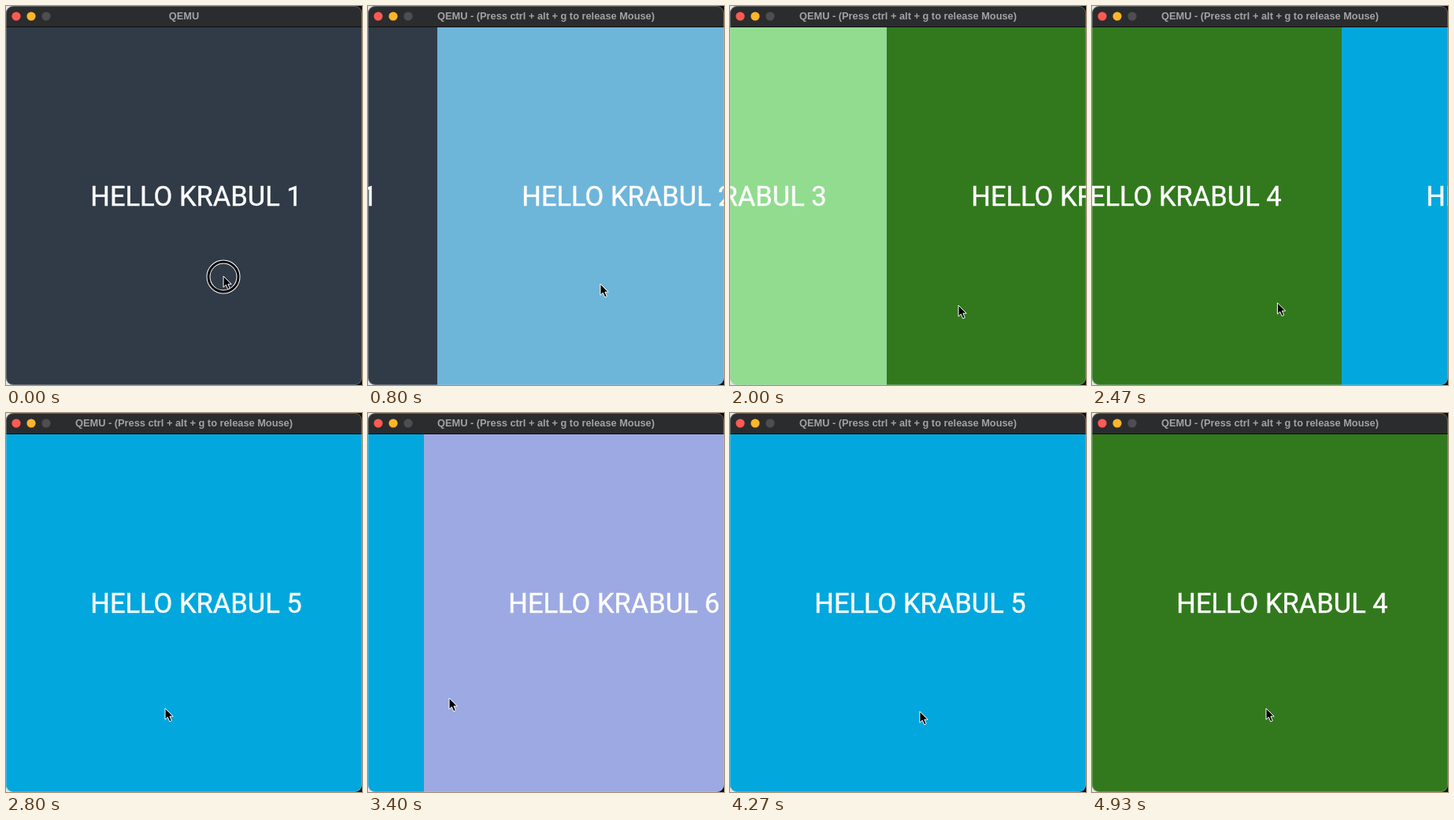
Recreate the animation shown at these times as an HTML page. Size 452 by 480 pixels, loop 4990 ms.

```html
<!DOCTYPE html>
<html lang="en">
<head>
<meta charset="utf-8">
<title>Swiper demo</title>
<style>
  html, body { margin: 0; width: 100%; height: 100%; overflow: hidden; }
  body { background: linear-gradient(to right, #e6e6e6, #0c0d0f); }
  svg { display: block; width: 100vw; height: 100vh; }
  .label { font: 34.5px Roboto, sans-serif; fill: #fff; stroke: #fff; stroke-width: .45px; }
  .title { font: bold 12.8px "Liberation Sans", Arial, sans-serif; fill: #a3a3a5; text-anchor: middle; }
</style>
</head>
<body>
<svg viewBox="0 0 452 480">
  <defs>
    <clipPath id="window"><rect width="452" height="480" rx="9"/></clipPath>
  </defs>
  <g clip-path="url(#window)">
    <g id="pages"></g>
    <rect width="452" height="27" fill="#2b2c2e"/>
    <rect y="26" width="452" height="1" fill="#0d0e10"/>
    <g id="buttons"></g>
    <text id="title" class="title" x="226" y="17.4"></text>
  </g>
  <rect x=".5" y=".5" width="451" height="479" rx="8.5" fill="none" stroke="#c8ccd0" stroke-opacity=".32"/>
  <g id="ring" fill="none">
    <circle cx="276" cy="343" r="19" stroke="#fff" stroke-width="5"/>
    <circle cx="276" cy="343" r="19" stroke="#000" stroke-width="3"/>
  </g>
  <path id="cursor" d="M0 0V14.2L3.3 11.2L5.7 16.8L8.3 15.7L5.9 10.2H10.2Z"
        fill="#000" stroke="#fff" stroke-linejoin="round"/>
</svg>
<script>
const LOOP = 4990, STEPS = 75, PAGE_WIDTH = 452;
const SWIPE_TIME = 520, GRAB_TIME = 190, LAST_PAGE = 5;
const pageColors = ["#313b47", "#6eb5da", "#92dc90", "#32791d", "#01a7dd", "#9da9e2"];
const buttonColors = ["#ff5a52", "#fdb52a", "#4e4e50"];
const swipeStarts = [430, 1080, 1716, 2270, 3008, 3690, 4350];

// key points of the pointer tip
const pointerKeys = [
  { t: 0, x: 276, y: 342 }, { t: 800, x: 295, y: 352 }, { t: 2000, x: 290, y: 379 },
  { t: 2800, x: 202, y: 374 }, { t: 3400, x: 103, y: 361 }, { t: 4270, x: 241, y: 378 },
  { t: 4930, x: 221, y: 374 }
];

const $ = id => document.getElementById(id);
const clamp = v => Math.max(0, Math.min(1, v));
const ease = p => (1 - Math.cos(Math.PI * clamp(p))) / 2;

$("pages").innerHTML = pageColors.map((color, i) => `
  <g transform="translate(${i * PAGE_WIDTH} 0)">
    <rect y="27" width="${PAGE_WIDTH + 1}" height="453" fill="${color}"/>
    <text class="label" x="107.3" y="252.8">HELLO KRABUL ${i + 1}</text>
  </g>`).join("");

$("buttons").innerHTML = buttonColors.map((color, i) =>
  `<circle cx="${13 + 19 * i}" cy="13" r="5.6" fill="${color}"/>`).join("");

// swipes run forward to the last page, then back
function pageAt(t) {
  const swiped = swipeStarts.reduce((sum, start) => sum + ease((t - start) / SWIPE_TIME), 0);
  return LAST_PAGE - Math.abs(LAST_PAGE - swiped);
}

function pointerAt(t) {
  let { x, y } = pointerKeys[0];
  pointerKeys.slice(1).forEach((key, i) => {
    const from = pointerKeys[i], p = ease((t - from.t) / (key.t - from.t));
    x += (key.x - from.x) * p;
    y += (key.y - from.y) * p;
  });
  return [x, y];
}

function draw(t) {
  const grabbed = t >= GRAB_TIME;
  $("pages").setAttribute("transform", `translate(${Math.round(-pageAt(t) * PAGE_WIDTH)} 0)`);
  $("cursor").setAttribute("transform", `translate(${pointerAt(t).join(" ")})`);
  $("ring").setAttribute("visibility", grabbed ? "hidden" : "visible");
  $("title").textContent = grabbed ? "QEMU - (Press ctrl + alt + g to release Mouse)" : "QEMU";
}

const origin = performance.now();
function tick() {
  const t = (performance.now() - origin) % LOOP;
  const step = Math.min(STEPS - 1, Math.floor(t / LOOP * STEPS + 0.03));
  draw(step * LOOP / STEPS);
  requestAnimationFrame(tick);
}
tick();
</script>
</body>
</html>
```
